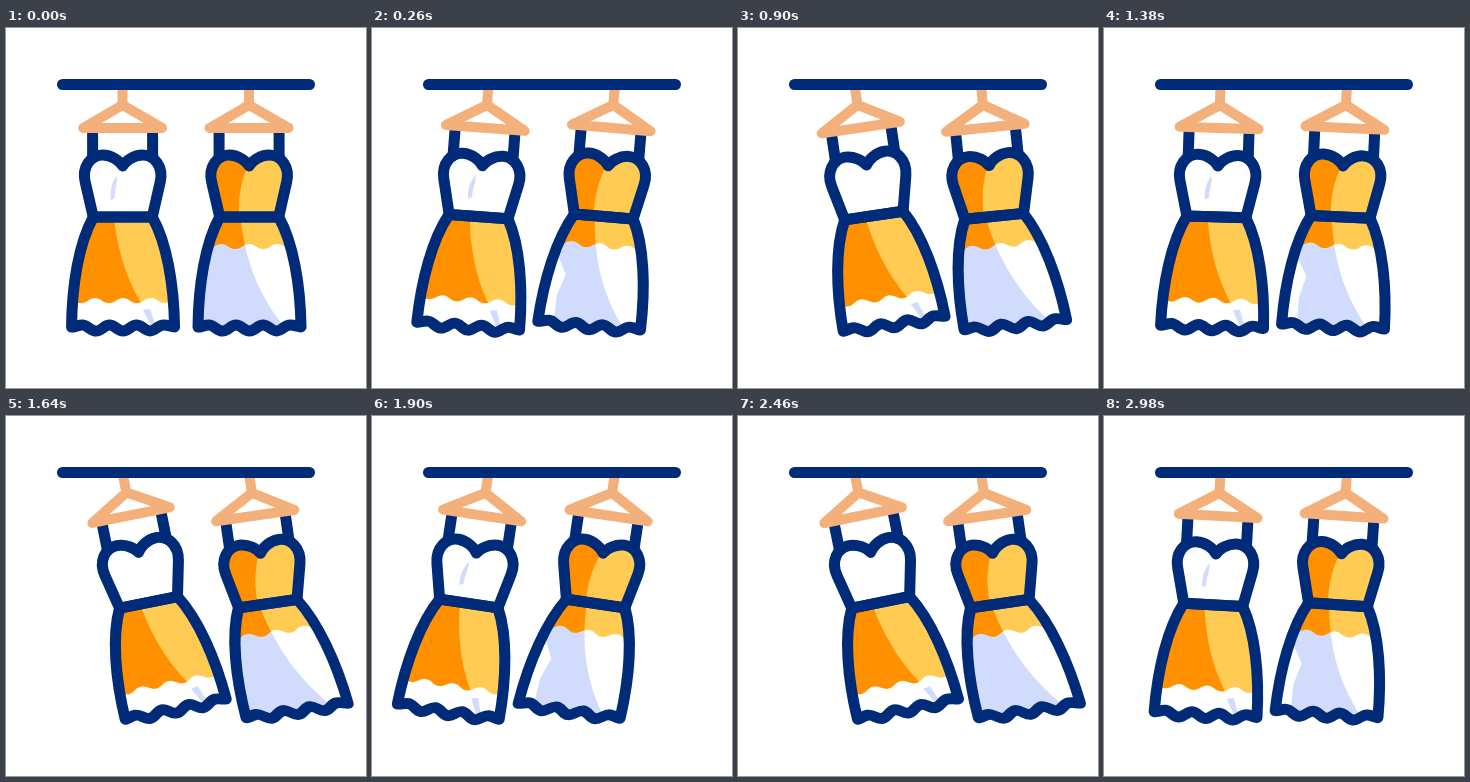
Animation, 360 px wide and 360 px high, one loop 3000 ms. Source, as an HTML page:

```html
<!DOCTYPE html>
<html lang="en">
<head>
<meta charset="utf-8">
<title>Dresses on a rail</title>
<style>
  /* --s: swing, 1 = far right, -1 = far left; --o: slight left bias of the second dress */
  @property --s { syntax: "<number>"; inherits: true; initial-value: 0; }
  @property --o { syntax: "<number>"; inherits: true; initial-value: 0; }

  html, body { margin: 0; width: 100%; height: 100%; overflow: hidden; background: #fff; }
  svg {
    display: block; width: 100vw; height: 100vh;
    animation: swing 3s cubic-bezier(.37, 0, .63, 1) -2.93s infinite,
               bias 3s linear infinite;
  }
  @keyframes swing {
    0%, 100% { --s: .7; }
    11%, 37.667%, 64.333% { --s: -1; }
    24.333%, 51%, 77.667% { --s: 1; }
    95.8% { --s: -.5; }
  }
  @keyframes bias {
    0% { --o: 0; }
    6%, 100% { --o: 1; }
  }

  .a { transform: rotate(calc(var(--s) * -12deg)); }
  .b { transform: rotate(calc(var(--s) * -10deg + var(--o) * 1.3deg)); }
  .skirt { transform-origin: 0 132px; }
  .a .skirt { transform: skewX(calc(var(--s) * 3deg)); }
  .b .skirt { transform: skewX(calc(var(--s) * 7.5deg)); }

  .line { fill: none; stroke: #002b79; stroke-width: 11; stroke-linecap: round; stroke-linejoin: round; }
  .hanger { fill: none; stroke: #f4b07a; stroke-width: 10; stroke-linejoin: round; }
  .dark { fill: #ff9100; }
  .light { fill: #ffcb52; }
  .pale { fill: #d1dcfd; }
  .glint { opacity: calc(1 - 3 * var(--s)); }
  .wash { fill: #fff; opacity: calc(-10 * var(--s) - .5); }
</style>
</head>
<body>
<svg viewBox="0 0 360 360">
  <defs>
    <path id="top" d="M-29.5 132L-37.5 97C-41 82-32 70-20 70C-11 70-3 76 0 81C3 76 11 70 20 70C32 70 41 82 37.5 97L29.5 132Z"/>
    <path id="hem" d="M-29.5 132C-44 158-51 200-51.5 242c4 0 6-2 11-2s8 6 13.5 6s8-6 13.5-6s8 6 13.5 6s8-6 13.5-6s8 6 13.5 6s8-6 13.5-6s7 2 11 2C51 200 44 158 29.5 132Z"/>
    <path id="band" d="M-56-90V-2c6 0 8 5 14 5s8-5 14-5s8 5 14 5s8-5 14-5s8 5 14 5s8-5 14-5s8 5 14 5s8-5 14-5V-90Z"/>
    <clipPath id="inTop"><use href="#top"/></clipPath>
    <clipPath id="inHem"><use href="#hem"/></clipPath>
    <clipPath id="left"><path d="M-70 130H-9C-5 170 6 205 33 240V260H-70Z"/></clipPath>
    <path id="straps" class="line" d="M-30 45V73M30 45V73"/>
    <path id="rack" class="hanger" d="M0 2V20M-39.5 43L0 20L39.5 43Z"/>
  </defs>

  <g transform="translate(116.5 57)">
    <g class="a">
      <use href="#straps"/>
      <path class="pale glint" d="M-6 91C-11 97-13 106-12 115L-8 113C-8 104-5 98-6 91Z"/>
      <g class="skirt">
        <g clip-path="url(#inHem)">
          <use href="#band" class="light" y="215"/>
          <g clip-path="url(#left)"><use href="#band" class="dark" y="215"/></g>
          <path class="pale" d="M20 225L27 224L31 236L36 243L28 241Z"/>
        </g>
        <use href="#hem" class="line"/>
      </g>
      <use href="#top" class="line"/>
      <use href="#rack"/>
    </g>
  </g>

  <g transform="translate(243 57)">
    <g class="b">
      <use href="#straps"/>
      <g clip-path="url(#inTop)">
        <path class="light" d="M-50 60H50V140H-50Z"/>
        <path class="dark" d="M-50 60H3L-1 80C-8 95-11 112-10 132V140H-50Z"/>
      </g>
      <g class="skirt">
        <g clip-path="url(#inHem)">
          <g clip-path="url(#left)">
            <path class="pale" d="M-60 130H60V260H-60Z"/>
            <path class="wash" d="M-60 150H-38L-40 175L-30 193L-36 214L-36 235L-32 250H-60Z"/>
          </g>
          <use href="#band" class="light" y="161"/>
          <g clip-path="url(#left)"><use href="#band" class="dark" y="161"/></g>
        </g>
        <use href="#hem" class="line"/>
      </g>
      <use href="#top" class="line"/>
      <use href="#rack"/>
    </g>
  </g>

  <path class="line" d="M56.5 56.5H303.5"/>
</svg>
</body>
</html>
```
